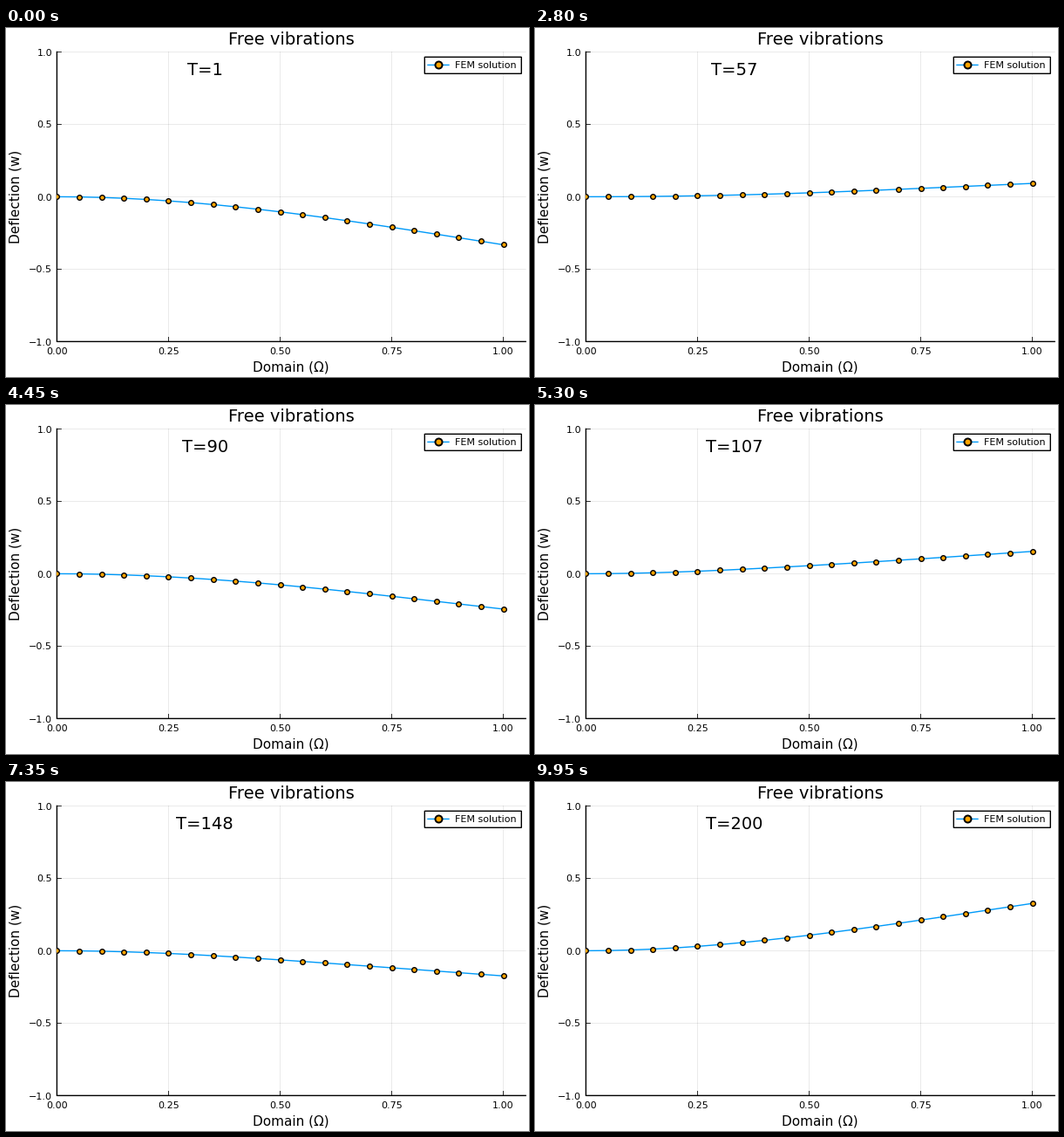
These frames come from a looping animation (600x400 px, 10000 ms). A matplotlib script:

```python
import numpy as np
import matplotlib.pyplot as plt
from matplotlib.animation import FuncAnimation
from matplotlib.patches import Rectangle

W, H, DPI = 600, 400, 100
FRAMES, INTERVAL = 200, 50
LEFT, RIGHT, TOP, BOTTOM = 58.4, 596.2, 27.4, 359.4
X_UNIT, Y_UNIT, Y_ZERO = 512.2, 166, 193.4
BLUE, ORANGE = "#009af9", "#ffa500"

plt.rcParams["font.family"] = "DejaVu Sans"
plt.rcParams["path.snap"] = False


def px(width):
    """Pixels to points."""
    return width * 72 / DPI


def to_x(x):
    return LEFT + X_UNIT * x


def to_y(y):
    return Y_ZERO - Y_UNIT * y


# Cantilever bent by a tip load, then released: sum of its bending modes.
ROOTS = np.array([1.875104, 4.694091, 7.854757, 10.995541, 14.137168])
NODES = np.linspace(0, 1, 21)


def mode_shape(b, x):
    s = (np.cosh(b) + np.cos(b)) / (np.sinh(b) + np.sin(b))
    return np.cosh(b * x) - np.cos(b * x) - s * (np.sinh(b * x) - np.sin(b * x))


SHAPES = np.array([-4 / b**4 * mode_shape(b, NODES) / mode_shape(b, 1.0)
                   for b in ROOTS])
# Phase per step under trapezoidal time stepping, 80 steps per first period.
THETA = 2 * np.arctan(np.pi / 80 * (ROOTS / ROOTS[0])**2)


def deflection(step):
    return (np.cos(THETA / 2) * np.cos((step - 0.5) * THETA)) @ SHAPES


fig = plt.figure(figsize=(W / DPI, H / DPI), dpi=DPI, facecolor="white")
ax = fig.add_axes([0, 0, 1, 1])
ax.set_xlim(0, W)
ax.set_ylim(H, 0)
ax.axis("off")


def line(xs, ys, width, color="black", **kw):
    return ax.plot(xs, ys, color=color, lw=px(width), **kw)[0]


def label(x, y, text, size, **kw):
    kw.setdefault("ha", "center")
    return ax.text(x, y, text, fontsize=size, va="baseline", **kw)


def markers(xs, ys, size, edge, **kw):
    return ax.plot(xs, ys, "o", ms=px(size), mfc=ORANGE, mec="black",
                   mew=px(edge), **kw)[0]


X_TICKS = [0, 0.25, 0.5, 0.75, 1]
Y_TICKS = [-1, -0.5, 0, 0.5, 1]

for v in X_TICKS:
    x = to_x(v)
    line([x, x], [TOP, BOTTOM], 0.8, alpha=0.1)
    line([x, x], [BOTTOM, BOTTOM - 5], 0.8)
    label(x, 374.3, f"{v:.2f}", 8)
for v in Y_TICKS:
    y = to_y(v)
    line([LEFT, RIGHT], [y, y], 0.8, alpha=0.1)
    line([LEFT, LEFT + 5], [y, y], 0.8)
    label(53, y + 4.1, f"{v:.1f}".replace("-", "\u2212"), 8, ha="right")
line([LEFT, LEFT, RIGHT], [TOP, BOTTOM, BOTTOM], 1.4)

label(327.3, 19.4, "Free vibrations", 14)
label(327.3, 394, "Domain (Ω)", 11)
label(15.7, 193.4, "Deflection (w)", 11, rotation=90,
      rotation_mode="anchor")
counter = label(228.3, 54.3, "", 14)

plot_area = Rectangle((LEFT, TOP), RIGHT - LEFT, BOTTOM - TOP,
                      transform=ax.transData)
node_x = to_x(NODES)
beam = line(node_x, node_x, 1.4, BLUE, zorder=3)
dots = markers(node_x, node_x, 5.6, 1.4, zorder=4)
for artist in (beam, dots):
    artist.set_clip_path(plot_area)

ax.add_patch(Rectangle((480.3, 33.3), 111, 19, fc="white", ec="black",
                       lw=px(1.4), zorder=5))
line([484, 508], [42.4, 42.4], 1.4, BLUE, zorder=6)
markers([495.8], [42.4], 8, 2, zorder=7)
label(515, 46, "FEM solution", 8, ha="left", zorder=7)


def update(i):
    step = i + 1
    y = to_y(deflection(step))
    beam.set_ydata(y)
    dots.set_ydata(y)
    counter.set_text(f"T={step}")
    return beam, dots, counter


anim = FuncAnimation(fig, update, frames=FRAMES, interval=INTERVAL,
                     repeat=True, repeat_delay=0, blit=False)
plt.show()
```
